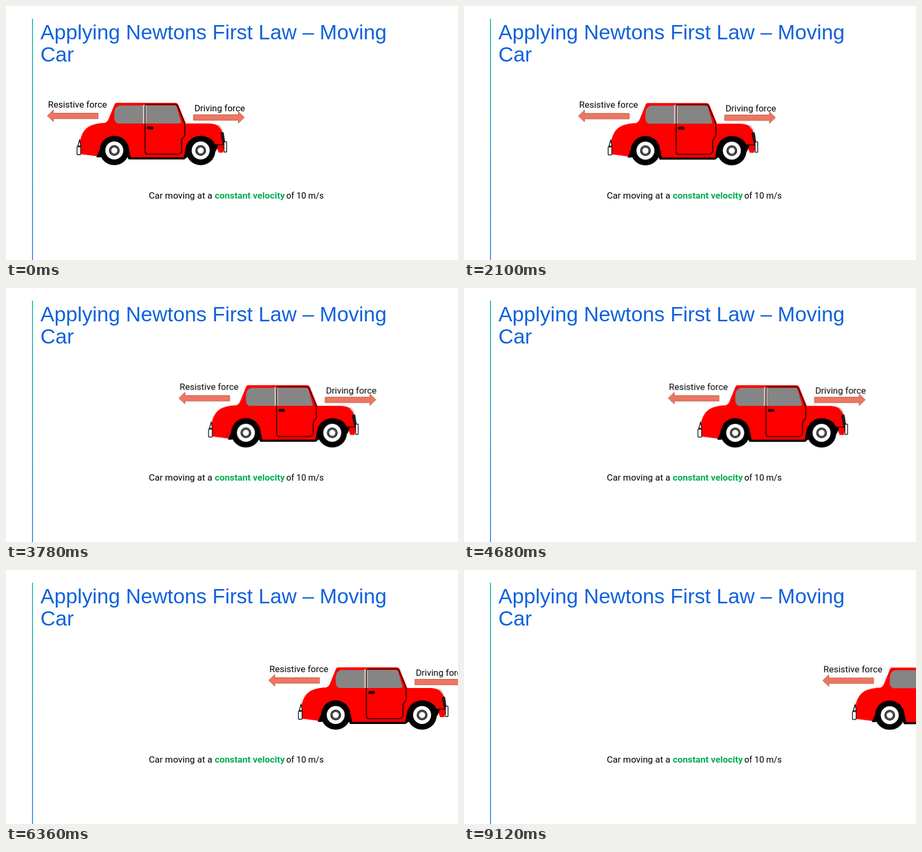
An HTML page that plays this animation: 853 px wide and 480 px high, repeating every 9.18 s.

```html
<!DOCTYPE html>
<html lang="en">
<head>
<meta charset="utf-8">
<title>Moving car</title>
<style>
  html, body { margin: 0; width: 100%; height: 100%; overflow: hidden; background: #fff; }
  svg { display: block; width: 853px; height: 480px; }
  .title { font: 39.2px "Liberation Sans", Arial, sans-serif; fill: #1062dc; }
  .label { font: 17px Roboto, sans-serif; fill: #000; }
  .caption { font: 17.2px Roboto, sans-serif; fill: #000; }
  .key { font-weight: 700; fill: #00ad50; }
  .unit { font-size: 16.3px; }
  .arrow { fill: #ed7661; stroke: #b9594a; stroke-width: 1; }
  .red { fill: #f00; }
  .glass { fill: #858585; }
  .trim { fill: #fff; stroke: #000; stroke-width: 1.4; }
  .line { fill: none; stroke: #000; stroke-width: 1.6; stroke-linejoin: round; }
</style>
</head>
<body>
<svg viewBox="0 0 853 480">
  <defs>
    <linearGradient id="rule" x1="0" y1="0" x2="0" y2="1">
      <stop offset="0" stop-color="#2fc0a6"/>
      <stop offset="1" stop-color="#4a8fe6"/>
    </linearGradient>
    <g id="wheel">
      <circle r="27.8"/>
      <circle r="17" fill="#fff"/>
      <circle r="9.2" fill="#888" stroke="#000" stroke-width="1.6"/>
      <circle r="6.6" fill="#fff" stroke="#000" stroke-width="1.2"/>
    </g>
  </defs>

  <rect x="49" y="24" width="2" height="456" fill="url(#rule)"/>
  <text class="title" x="65" y="63">Applying Newtons First Law – Moving</text>
  <text class="title" x="65" y="105">Car</text>
  <text class="caption" x="269.5" y="364">Car moving at a</text>
  <text class="caption key" x="394" y="364">constant velocity</text>
  <text class="caption unit" x="529" y="364">of 10 m/s</text>

  <g id="car">
    <!-- body -->
    <path class="red" d="M204 187Q205 183 209 183H319Q323 183 325 187L339 222H384Q401 223 406 233
      Q411 245 412 262L409 277H401L396 264L340 286H232L172 284L141 280Q138 264 140 252
      Q145 231 162 225Q174 221 186 221Q191 219 193 214Z"/>
    <path d="M398 224L404 226L410 236L406 234Z" fill="#cfcfc8"/>

    <!-- windows and door -->
    <path class="glass" d="M214 188H258V222H211Q204 220 204 211V202Q205 190 214 188Z"/>
    <rect x="258" y="187" width="7" height="35" fill="#d2cdc8"/>
    <path class="glass" d="M265 188H318Q321 188 322 191L330 219Q330 222 327 222H265Z"/>
    <path class="line" d="M262 190Q262 186 266 186H319Q322 186 323 189L336 220Q337 223 337 230V244
      Q336 248 333 250Q331 252 331 257V273Q330 280 324 280H267Q262 280 262 275Z"/>
    <rect x="266" y="228" width="11.5" height="5" rx="1.5"/>

    <!-- arches, sill and wheels -->
    <path d="M170 286L178 268Q186 249 206 249.5Q225 250 231 268L235 286H335
      L339 266Q346 246 368 246Q388 247 394 261L400 264L396 274L380 286H341L336 290H231L226 280L176 286Z"/>
    <use href="#wheel" x="204" y="273"/>
    <use href="#wheel" x="367" y="273"/>

    <!-- lights and bumpers -->
    <path class="trim" d="M135 265L138.5 253L141 264Z"/>
    <rect class="trim" x="133.6" y="266" width="7" height="15" rx="1"/>
    <path d="M405 241Q408 236 410 240L413 261L409 260Z" fill="#222" stroke="#000"/>
    <path class="line" d="M396 262H411"/>
    <rect class="trim" x="411" y="256.5" width="5" height="19.5" rx="1"/>

    <!-- forces -->
    <path class="arrow" d="M77.5 207.5L89 196.5V202.5H173.5V213H89V218.5Z"/>
    <path class="arrow" d="M449.5 210.5L438 199.5V205.5H353.5V216H438V221.5Z"/>
    <text class="label" x="78.8" y="192">Resistive force</text>
    <text class="label" x="355" y="199">Driving force</text>
  </g>
</svg>
<script>
  const LOOP = 9180, STEP = 60;
  document.getElementById('car').animate(
    [{ transform: 'translate(0.4px, 0px)' }, { transform: 'translate(603.4px, 1.4px)' }],
    { duration: LOOP, iterations: Infinity, easing: `steps(${LOOP / STEP}, end)` }
  );
</script>
</body>
</html>
```
